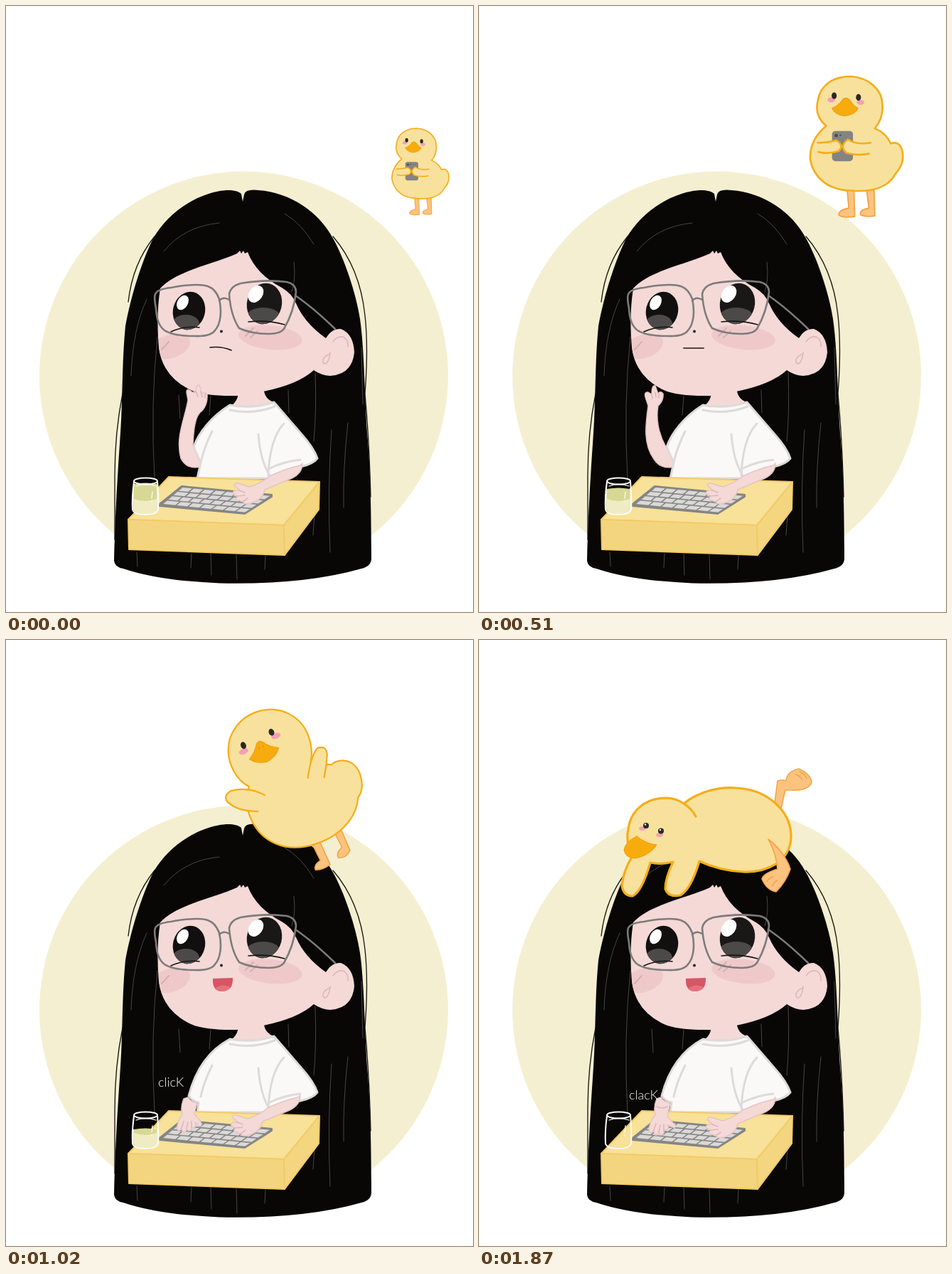
These frames come from a looping animation (657 by 852 pixels, 2.04 s). An HTML page:

```html
<!DOCTYPE html>
<html lang="en">
<head>
<meta charset="utf-8">
<title>Girl and duck</title>
<style>
html, body { margin: 0; width: 100%; height: 100%; overflow: hidden; background: #fff; }
svg { display: block; width: 100vw; height: 100vh; }
path { stroke-linecap: round; stroke-linejoin: round; }
.line { fill: none; }
.skin { fill: #f4d9d7; stroke: #e6c3c5; stroke-width: 1.4; }
.crease { fill: none; stroke: #dfb6ba; stroke-width: 1.6; }
.shirt { fill: #faf9f8; stroke: #dddbd9; stroke-width: 3; }
.fold { fill: none; stroke: #dddbd9; stroke-width: 3; }
.duck { fill: #f8e19c; stroke: #f5ad18; stroke-width: 2.2; }
.thick { stroke-width: 3.2; }
.beak { fill: #f8ab0c; stroke: #ee9d10; stroke-width: 1; }
.leg { fill: #fcc37f; stroke: #f3a548; stroke-width: 1.6; }
.pink { fill: #f2a0b4; }
.ink { fill: #2a2826; }
text { font: 300 18px Lato, "Open Sans", sans-serif; fill: #fff; }
</style>
</head>
<body>
<svg viewBox="0 0 657 852" preserveAspectRatio="none">
<defs>
  <clipPath id="cup"><path d="M180 669Q177 690 179 708Q181 714 196 714Q211 714 213 708Q215 690 213 669Z"/></clipPath>
  <clipPath id="eyeL"><ellipse cx="257.500" cy="428.500" rx="22.500" ry="27" transform="rotate(14 257.500 428.500)"/></clipPath>
  <clipPath id="eyeR"><ellipse cx="363.500" cy="418.500" rx="24.500" ry="29" transform="rotate(14 363.500 418.500)"/></clipPath>
</defs>

<circle cx="334.500" cy="520" r="287.500" fill="#f5efd1"/>

<!-- hair -->
<path fill="#080705" d="M331 264C322 256 300 259 285 264C250 275 223 300 208 325C193 354 177 402 168 450C163 500 164 560 161 600C157 660 153 720 152 780Q153 789 165 791Q215 808 300 811.500Q420 814 500 791Q513 788 514 778C514 720 513 650 508 600C504 540 504 480 498 440C493 405 475 352 459 325C440 290 400 262 355 259Q337 257 335 265L333 275Z"/>
<g class="line" stroke="#14120f" stroke-width="1.300">
  <path d="M209 324Q178 362 172 416M164 545Q153 600 153 660L153 750"/>
  <path d="M460 324Q498 368 505 435Q510 480 505 545Q511 610 513 690"/>
</g>
<g class="line" stroke="#474543" stroke-width="1">
  <path d="M222 345Q250 310 300 305M392 292Q416 306 433 335M405 360Q408 385 402 402"/>
  <path d="M213 465Q203 560 209 665M198 412Q178 455 176 520M243 547L245 580M288 548L286 575M397 540L398 572M435 515Q437 570 433 612M458 596Q452 680 456 768M481 586Q474 650 475 705M434 715L432 744M500 480L502 560"/>
  <path d="M184 768L185 788M261 770L260 790M288 770L289 800M324 772L325 806M365 773L364 792"/>
</g>

<!-- neck and face -->
<path fill="#f4d9d7" d="M327 535Q329 553 317 562Q345 569 377 557Q363 553 362 535Z"/>
<path fill="#f4d9d7" d="M217 397C240 372 286 365 325 348L329 344L331 348L334 344L336 348L340 346C348 367 365 384 388 396Q402 404 408 418Q420 446 450 467Q458 453 471 454Q489 461 490 487Q487 518 456 520Q443 519 433 512Q411 532 362 542L327 548Q280 549 260 540Q220 521 215 480Q211 435 217 397Z"/>
<path class="crease" d="M460 472Q467 462 476 466Q482 471 481 479M456 487Q455 499 450 503Q445 503 446 497Q448 492 456 489"/>
<g fill="#efc9ca">
  <path d="M215 468Q237 456 255 464Q264 472 253 485Q238 498 219 496Q214 483 215 468Z"/>
  <ellipse cx="372" cy="466" rx="45" ry="17" transform="rotate(6 372 466)"/>
</g>
<path class="line" stroke="#d3b1b2" stroke-width="2" d="M219 483L229 472M337 464L348 453M344 466L354 457"/>

<!-- eyes -->
<g clip-path="url(#eyeL)">
  <rect x="230" y="398" width="56" height="60" fill="#11100f"/>
  <ellipse cx="253" cy="447" rx="19" ry="13" fill="#4c4a49"/>
</g>
<ellipse cx="248.500" cy="417" rx="7.500" ry="11" transform="rotate(28 248.500 417)" fill="#fff"/>
<g clip-path="url(#eyeR)">
  <rect x="335" y="386" width="60" height="64" fill="#191817"/>
  <ellipse cx="362" cy="436" rx="23" ry="12" fill="#4c4a49"/>
</g>
<ellipse cx="351.500" cy="405" rx="9.500" ry="13" transform="rotate(36 351.500 405)" fill="#fff"/>
<path class="line" stroke="#171514" stroke-width="1.600" d="M232 458Q252 449 272 452M341 444Q368 441 392 448"/>
<circle cx="303" cy="457.500" r="2" fill="#26201f"/>

<!-- glasses -->
<g class="line" stroke="#7d7c7b" stroke-width="2.600">
  <path d="M210 405Q213 398 232 396Q270 389 284 394Q295 398 300 412C304 430 302 447 294 456Q288 465 265 464Q235 464 223 456Q212 448 211 425Q208 410 210 405Z"/>
  <path d="M300 414Q306 408 314 413"/>
  <path d="M314 405Q316 394 330 390Q365 384 395 388Q408 391 408 402Q405 430 391 454Q386 461 370 461Q345 461 328 453Q316 435 314 405Z"/>
  <path d="M407 407Q432 424 463 454"/>
</g>

<!-- mouths -->
<g class="line" stroke="#171313" stroke-width="1.700">
  <path data-on="0 1" d="M287 480Q303 478 317 484"/>
  <path data-on="2 3" d="M288 481L316 481"/>
  <path data-on="4" d="M289 482Q308 484 319 477"/>
</g>
<g data-on="5 6 7 8 9 10 11">
  <path fill="#d65665" d="M291 476L319 475Q320 494 303 494Q290 493 291 476Z"/>
  <path fill="#e5717a" d="M294 490Q304 482 316 488Q312 494 303 494Q297 494 294 490Z"/>
</g>

<!-- raised arm -->
<g data-on="0 1">
  <path class="skin" d="M256 554C251 582 238 607 246 636Q254 652 273 648L274 630L263 617C264 595 266 575 276 569Q284 560 283 546Q279 541 276 545L272 533Q267 532 267 543L262 543Q254 536 254 543Z"/>
  <path class="crease" d="M267 541L270 549M274 542L276 550M280 545L280 551"/>
</g>
<g data-on="2 3">
  <path class="skin" d="M238 562C234 590 231 616 246 637Q256 652 273 648L274 628L263 620C252 600 249 580 252 562Q260 555 259 545Q255 540 252 545L248 534Q243 532 243 546L238 543Q232 542 234 550Z"/>
  <path class="crease" d="M243 546L244 552M248 543L249 550M253 545L253 551"/>
</g>
<g data-on="4">
  <path class="skin" d="M217 571C218 600 227 622 241 639Q255 655 272 651L275 630L263 625C248 612 238 594 233 571Q238 560 236 549Q233 545 230 549L227 545Q222 543 222 549L219 544Q214 542 215 552Q209 550 211 556Z"/>
  <path class="crease" d="M218 549L221 556M224 549L226 556M230 549L231 556"/>
</g>

<!-- shirt -->
<path data-on="0 1 2 3 4" class="shirt" d="M315 561C289 577 271 600 264 620L274 642L269 664L371 664Q392 651 414 648Q432 644 438 636Q433 621 415 601L377 557Q347 567 315 561Z"/>
<path data-on="5 6 7 8 9 10 11" class="shirt" d="M315 561C285 577 266 606 257 641Q262 648 271 650L269 664L371 664Q392 651 414 648Q432 644 438 636Q433 621 415 601L377 557Q347 567 315 561Z"/>
<path class="fold" d="M315 568Q347 575 378 563M355 602Q358 640 371 660M391 587Q371 608 369 660M371 650Q392 640 414 638M290 598Q278 622 274 642"/>

<!-- table -->
<g stroke="#f3cb68" stroke-width="2">
  <path fill="#f8e198" d="M229 662L441 669L391 730L172 722Z"/>
  <path fill="#f4d57f" d="M172 722L391 730L392 772L173 764Z"/>
  <path fill="#f4d680" d="M441 669L391 730L392 772L440 708Z"/>
</g>
<path fill="#858585" stroke="#858585" stroke-width="2" d="M247 675L374 687L374 690L336 714L216 703L216 700Z"/>
<path id="keys" fill="#dad9d7"/>

<!-- resting arm -->
<g id="armR">
  <path class="skin" d="M417 643Q417 657 402 664L364 680Q361 694 345 699Q336 702 333 697L327 695Q321 694 326 689L321 687Q317 682 324 681L329 681L321 674Q323 669 330 672L343 676Q361 670 371 661Q394 650 414 646Z"/>
  <path class="crease" d="M328 681L336 684M326 689L336 688M333 697L340 692"/>
</g>

<!-- typing hand -->
<g data-on="6 8 10">
  <path class="skin" d="M250 645Q245 658 248 667Q240 678 241 688Q244 692 247 686L248 691Q252 694 254 688L257 690Q261 691 261 685L264 686Q268 685 266 678L273 684Q277 682 273 676L265 666L269 651Q258 648 256 643Z"/>
  <path class="crease" d="M247 686L250 677M254 687L256 678M261 685L261 677"/>
</g>
<g data-on="5 7 9 11">
  <path class="skin" d="M250 645Q245 657 248 667Q239 680 239 691Q242 695 246 689L247 695Q250 698 253 692L256 696Q260 697 260 690L264 688Q268 686 265 682L275 686Q279 683 273 679L265 670L269 651Q258 648 256 643Z"/>
  <path class="crease" d="M246 689L249 680M253 692L255 682M260 690L260 681M250 656Q258 660 265 656"/>
</g>
<text data-on="6 8 10" x="214" y="628">clicK</text>
<text data-on="5 7 9 11" x="211" y="646">clacK</text>

<!-- glass -->
<g id="drink" clip-path="url(#cup)">
  <rect id="juice" x="176" width="40" height="60" fill="#efecc4"/>
  <path id="top" fill="#d6d893"/>
</g>
<g class="line" stroke="#fbfbf7" stroke-width="2">
  <path d="M180 669Q177 690 178 708Q180 715 196 715Q212 715 214 708Q215 690 213 669"/>
  <ellipse cx="196.500" cy="668" rx="16.500" ry="4.500"/>
  <path d="M183 675Q196 670 211 675M206 683L205 692M205 696L205 697" stroke-width="1.300"/>
</g>

<!-- duck with phone -->
<g id="phoneDuck">
  <path class="leg" d="M537 264L539 286Q527 288 527 294Q531 298 546 296L545 264ZM560 262L563 286Q551 288 553 294Q560 297 570 295L569 262Z"/>
  <path class="duck" d="M512 188C500 178 500 166 502 158C505 138 522 129 541 129C563 130 579 145 579 163C580 175 576 184 570 191Q583 196 589 209Q600 205 603 219C605 235 598 240 594 246C585 262 565 267 542 265C515 265 497 250 493 228C492 210 500 198 512 188Z"/>
  <ellipse class="pink" cx="518" cy="157" rx="4.500" ry="3"/><ellipse class="pink" cx="553" cy="160" rx="4.500" ry="3"/>
  <ellipse class="ink" cx="521.500" cy="152" rx="3" ry="4"/><ellipse class="ink" cx="550.500" cy="154" rx="3" ry="4"/>
  <path class="beak" d="M519 167Q528 163 532 156Q536 153 540 157Q544 164 550 167Q546 175 534 176Q523 175 519 167Z"/>
  <rect x="519" y="194" width="25" height="36" rx="4" fill="#858483"/>
  <circle cx="524" cy="199.500" r="2" fill="#4b4a49"/><circle cx="529" cy="199" r="1" fill="#4b4a49"/>
  <path class="duck" d="M502 208Q514 208 524 205Q534 211 527 218Q514 222 503 219M565 208Q548 211 538 204Q527 212 536 220Q550 224 563 221"/>
</g>

<!-- jumping duck -->
<g id="jumpDuck">
  <path class="leg" d="M509 256L512 283Q500 286 501 293Q510 297 523 293L520 256ZM544 252L547 276Q536 280 537 288Q547 293 556 284L554 250Z"/>
  <path class="duck" d="M453 151C438 135 438 110 442 97C450 68 478 55 499 56C535 57 556 85 556 112C556 128 552 140 546 149L573 162Q576 160 580 160C596 160 606 172 606 188Q605 210 592 218C583 240 555 260 515 259C470 258 439 230 440 186Q443 165 453 151Z"/>
  <path class="duck" d="M470 170Q452 150 427 148Q415 150 417 160Q425 178 453 188M535 168Q550 140 562 133Q575 133 572 146Q566 160 557 175"/>
  <ellipse class="pink" cx="463" cy="102" rx="7" ry="4"/><ellipse class="pink" cx="513" cy="97" rx="7" ry="4"/>
  <ellipse class="ink" cx="465.500" cy="94" rx="3.800" ry="5"/><ellipse class="ink" cx="509" cy="90" rx="3.800" ry="5"/>
  <path class="beak" d="M467 115Q478 108 483 99Q488 93 493 99Q499 108 511 114Q504 125 489 127Q474 125 467 115Z"/>
  <path class="line" stroke="#d98805" d="M485 104L485 106M491 104L491 106"/>
</g>

<!-- resting duck -->
<g data-on="7 8 9 10 11">
  <path class="leg" d="M415 236L420 198Q427 196 432 198Q433 185 450 181Q466 188 468 200Q464 212 440 211L431 211Q428 222 425 238Z"/>
  <path class="line" stroke="#f3a548" stroke-width="1.500" d="M445 189Q452 191 455 197M451 185Q459 189 461 195"/>
  <path class="duck thick" d="M288 230C310 212 340 206 362 208C405 210 440 240 439 278C437 312 405 327 372 326Q338 324 310 311Q298 351 283 359Q266 362 262 350Q262 335 273 312Q256 316 241 313Q229 354 216 360Q203 360 201 345Q203 325 215 305Q206 284 210 266C213 240 233 223 262 222Q277 222 288 230Q299 237 305 248Q299 237 288 230Z"/>
  <path class="leg" d="M407 280Q418 300 420 322Q400 328 398 336Q405 352 418 354Q432 340 438 322Q430 298 407 280Z"/>
  <path class="line" stroke="#f3a548" stroke-width="1.500" d="M405 339Q409 334 414 333M413 346Q415 340 420 338"/>
  <ellipse class="pink" cx="230" cy="265" rx="5" ry="3"/><ellipse class="pink" cx="254" cy="274" rx="5" ry="3"/>
  <circle class="ink" cx="235" cy="261" r="4"/><circle class="ink" cx="256" cy="268.500" r="4"/>
  <circle cx="234" cy="259.500" r="1.200" fill="#fff"/><circle cx="255" cy="267" r="1.200" fill="#fff"/>
  <path class="beak" d="M222 276Q206 283 204 295Q206 307 220 307Q240 303 250 288Q236 287 222 276Z"/>
</g>
</svg>

<script>
const STEP = 170, COUNT = 12;
const el = id => document.getElementById(id);
const show = (node, on) => { node.style.display = on ? '' : 'none'; };

const toggles = [...document.querySelectorAll('[data-on]')].map(node =>
  ({ node, steps: new Set(node.dataset.on.split(' ').map(Number)) }));

// left, top, scale while the duck approaches
const approach = [[543, 172, .725], [519, 143, .9], [493, 129, 1], [466, 99, 1.18]];
// head centre and tilt during the jump
const jump = [[498, 113, 0], [437, 125, -10], [371, 155, -20]];
// surface of the drink until the glass is empty
const levels = [672, 672, 679, 679, 679, 683, 688, 698, 706];

// Keys lie on a skewed four-row grid.
function keyPath() {
  const at = (u, v) => {
    const x = 248 - 29 * v + u * (125 - 8 * v);
    const y = 676 + 24.5 * v + u * 12;
    return x.toFixed(1) + ' ' + y.toFixed(1);
  };
  let d = '';
  for (let r = 0; r < 4; r++) {
    const cols = r === 3 ? 7 : 8, shift = r % 2 ? .02 : 0;
    for (let c = 0; c < cols; c++) {
      const u0 = c / cols + .012 + (c ? shift : 0);
      const u1 = (c + 1) / cols - .006 + (c < cols - 1 ? shift : 0);
      const v0 = r / 4 + .035, v1 = (r + 1) / 4 - .025;
      d += `M${at(u0, v0)}L${at(u1, v0)}L${at(u1, v1)}L${at(u0, v1)}Z`;
    }
  }
  return d;
}

function draw(step) {
  for (const t of toggles) show(t.node, t.steps.has(step));

  const near = approach[step];
  show(el('phoneDuck'), near);
  if (near) {
    const [x, y, s] = near;
    el('phoneDuck').setAttribute('transform', `translate(${x} ${y}) scale(${s}) translate(-493 -129)`);
  }

  const leap = jump[step - 4];
  show(el('jumpDuck'), leap);
  if (leap) {
    const [x, y, a] = leap;
    el('jumpDuck').setAttribute('transform', `translate(${x} ${y}) rotate(${a}) translate(-498 -113)`);
  }

  const level = levels[step];
  show(el('drink'), level);
  if (level) {
    const low = Math.max(696, level + 5);
    el('juice').setAttribute('y', level);
    el('top').setAttribute('d', `M180 ${level}Q196 ${level - 3} 212 ${level}L212 ${low - 3}Q196 ${low + 3} 180 ${low - 3}Z`);
  }

  const typing = step > 4;
  const lift = typing && step % 2 === 0 ? -3 : 0;
  el('armR').setAttribute('transform', `translate(${lift} ${lift})`);
}

el('keys').setAttribute('d', keyPath());
let last = -1;
function tick() {
  const step = Math.floor(performance.now() / STEP) % COUNT;
  if (step !== last) draw(last = step);
  requestAnimationFrame(tick);
}
tick();
</script>
</body>
</html>
```
